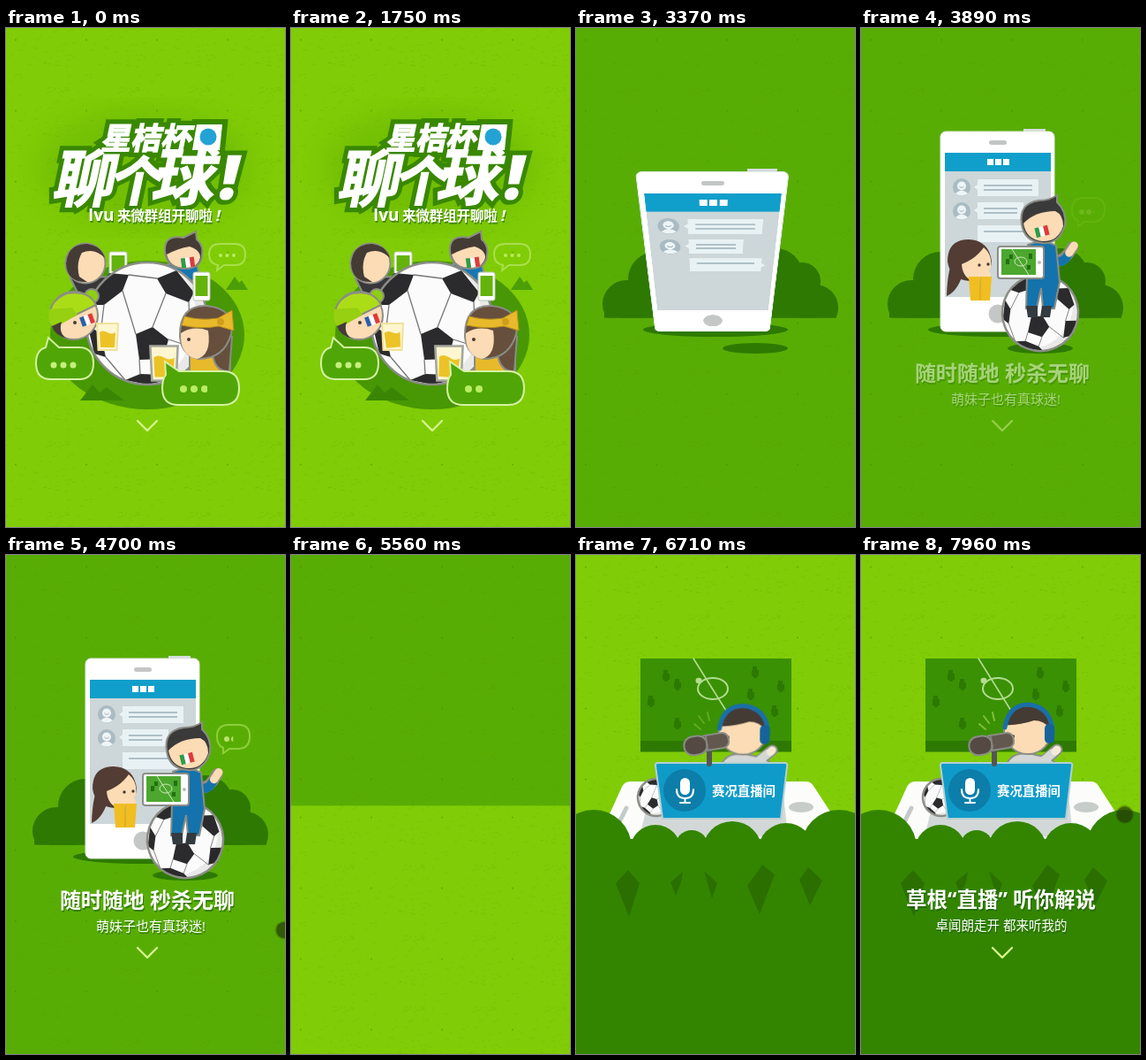
These frames come from a looping animation (316 px wide and 564 px high, 8 s). An HTML page:

```html
<!DOCTYPE html>
<html lang="zh">
<head>
<meta charset="utf-8">
<style>
  html, body { margin: 0; width: 100%; height: 100%; overflow: hidden; background: #80cc06; }
  div, svg { position: absolute; left: 0; top: 0; width: 316px; height: 564px; }
  #stage { overflow: hidden; overflow: clip; contain: strict; }
  text { font-family: "Open Sans", "Noto Sans CJK SC", "Noto Sans CJK", sans-serif; fill: #fff; }
  .shadow { filter: drop-shadow(1px 2px 0 rgba(25, 85, 0, .55)); }
</style>
</head>
<body>
<div id="stage"></div>
<script>
const LOOP = 8000, SKIN = '#fbdcb5', HAIR = '#453b35', EDGE = 'stroke="#8b8d86" stroke-width="2"';
const byId = id => document.getElementById(id);
const clamp = v => Math.max(0, Math.min(1, v));
const span = (t, start, length) => clamp((t - start) / length);
const sine = p => (1 - Math.cos(Math.PI * p)) / 2;
const mix = (a, b, p) => a + (b - a) * p;

// SVG helpers
const circle = (x, y, r, fill, more = '') => `<circle cx="${x}" cy="${y}" r="${r}" fill="${fill}" ${more}/>`;
const oval = (x, y, rx, ry, fill, more = '') => `<ellipse cx="${x}" cy="${y}" rx="${rx}" ry="${ry}" fill="${fill}" ${more}/>`;
const rect = (x, y, w, h, fill, rx = 0, more = '') => `<rect x="${x}" y="${y}" width="${w}" height="${h}" rx="${rx}" fill="${fill}" ${more}/>`;
const path = (d, fill, more = '') => `<path d="${d}" fill="${fill}" ${more}/>`;
const line = (d, color, width, more = '') => path(d, 'none', `stroke="${color}" stroke-width="${width}" stroke-linecap="round" stroke-linejoin="round" ${more}`);
const group = (content, more = '') => `<g ${more}>${content}</g>`;
const label = (str, x, y, size, weight = 400, more = '') => `<text x="${x}" y="${y}" font-size="${size}" font-weight="${weight}" ${more}>${str}</text>`;
const centred = (str, x, y, size, weight = 400) => label(str, x, y, size, weight, 'text-anchor="middle"');

function layer(parent, content, origin) {
  const div = document.createElement('div');
  div.innerHTML = `<svg viewBox="0 0 316 564">${content}</svg>`;
  if (origin) div.style.transformOrigin = origin;
  return parent.appendChild(div);
}

let seed = 7;
const random = () => (seed = seed * 16807 % 2147483647) / 2147483647;
function grain() {
  let d = '';
  for (let i = 0; i < 60; i++) {
    d += `M${(random() * 76).toFixed(1)} ${(random() * 78).toFixed(1)}l${(1 + random() * 3).toFixed(1)} ${(random() * 2 - 1).toFixed(1)}`;
  }
  return `<defs><pattern id="grain" width="80" height="80" patternUnits="userSpaceOnUse">
    ${line(d, '#2f7000', .8, 'opacity=".13"')}${circle(11, 13.5, .9, '#3f8000', 'opacity=".5"')}</pattern></defs>`;
}
const ground = color => rect(0, 0, 316, 564, color) + rect(0, 0, 316, 564, 'url(#grain)');

const flag = (x, y, angle, colors) => group(colors.map((c, i) => rect(i * 5 - 7.5, -5.5, 5, 11, c)).join(''),
  `transform="translate(${x} ${y}) rotate(${angle})"`);
const ITALY = ['#2f9b48', '#fff', '#dd3b3b'], FRANCE = ['#2d5fae', '#fff', '#dd3b3b'];

const ball = (x, y, r, angle = 0) => group(
  circle(0, 0, 69, '#fbfbfb') +
  path('M-60-36L-43-57L-21-55L-28-37L-49-21L-66-21ZM11-51L33-60L53-35L47-24L21-34ZM-13 12L6 4L24 18L18 40L-9 41ZM48 -2L69-10V18L55 28ZM-68 0L-53 12L-47 38L-60 34ZM-25 64L-8 57L18 58L28 63L0 69Z', '#2b2b2d') +
  line('M-21-55L11-51M-28-37L-13 12M21-34L6 4M-49-21L-53 12M47-24L48-2M24 18L55 28M18 40V58M-9 41L-8 57M-47 38L-25 64', '#777', 1.3) +
  path('M38-57A69 69 0 0 1 0 69A80 80 0 0 0 38-57', '#000', 'opacity=".07"') +
  circle(0, 0, 69, 'none', `stroke="#8b8d86" stroke-width="${2.5 * 69 / r}"`),
  `transform="translate(${x} ${y}) scale(${r / 69}) rotate(${angle})"`);

// Typing dots revealed from left to right
const typers = [];
function dots(x, y, gap, r, fill, phase, travel) {
  const id = 'typing' + typers.length;
  typers.push({ id, phase, travel });
  return `<clipPath id="${id}"><rect x="${x - r - 1}" y="${y - 9}" height="18" width="0"/></clipPath>` +
    group([0, 1, 2].map(i => circle(x + i * gap, y, r, fill)).join(''), `clip-path="url(#${id})"`);
}

const arrow = line('M149 444L160 455L171 444', '#d6f590', 2.4);

// Scene 1: title and fans around the ball
const mug = (id, x, y, s, rim) => group(
  path('M-12-15H12L10.500 15H-10.500Z', '#fdf6d0', `stroke="${rim}" stroke-width="2"`) +
  group(path('M-9-5Q-5-8 0-5T9-5L8 12H-8Z', '#ecc327'), `id="${id}"`),
  `transform="translate(${x} ${y}) scale(${s})"`);
const handset = (x, y, w, h) => rect(x, y, w, h, '#fff', 2, 'stroke="#b9c5ae"') + rect(x + 2.5, y + 4, w - 5, h - 9, '#63b30c');

const titleWords =
  group(label('星桔杯', 0, 0, 34, 900), 'transform="translate(107 137) skewX(-12)"') +
  group(label('聊', 0, 0, 70, 900) + label('个', 64, -1, 60, 900) + label('球', 112, -2, 71, 900) + label('!', 187, -3, 68, 900),
    'transform="translate(51 196) skewX(-12)"');
const titleBubble = path('M216 109H245L242 138H229L222 144L221 138H211Z', '#fff');
const title =
  oval(158, 158, 120, 66, '#4f9c00', 'opacity=".28" filter="url(#soft)"') +
  group(titleWords + titleBubble, 'stroke="#398800" stroke-width="12" stroke-linejoin="miter" stroke-miterlimit="2"') +
  group(titleWords, 'stroke="#fff" stroke-width="1.500"') + titleBubble + circle(229, 123, 9.5, '#23a3d5') +
  group(label('Ivu', 93, 218, 19, 700) + label('来微群组开聊啦', 126, 218, 15.4, 700) +
    group(label('!', 0, 0, 17, 700), 'transform="translate(237 218) skewX(-12)"'), 'class="shadow"');

const fans =
  oval(160, 347, 110, 84, '#489705') +
  path('M249 296L259 281L264 288L267 285L274 296Z', '#4c9e07') +
  path('M84 421L98 403L106 412L114 406L134 421Z', '#3a8604') +
  path('M73 283L84 305H104L116 281Z', '#38383a', EDGE) +
  circle(90, 266, 22.5, SKIN, EDGE) +
  path('M92 287Q69 288 68 266Q70 244 92 244Q108 246 112 260Q100 248 86 254Q79 266 83 281Z', HAIR) +
  handset(117, 253, 20, 27) +
  path('M183 267H216L220 284Q200 290 184 278Z', '#1677b2', EDGE) +
  path('M180 252Q179 233 201 237Q207 234 215 230L216 239Q224 246 222 256Q222 272 201 272Q181 270 180 252Z', HAIR, EDGE) +
  path('M182 256Q195 249 208 247Q220 251 220 259Q218 271 202 271Q185 270 182 256Z', SKIN) +
  flag(206, 265, -8, ITALY) +
  ball(160, 334, 69) +
  handset(212, 276, 19, 32) +
  circle(97, 303, 8, '#8fce12', EDGE) +
  circle(77, 325, 27, SKIN, EDGE) +
  path('M51 334Q45 309 69 300Q94 296 102 313L61 333Z', '#abdd17', EDGE) +
  path('M49 318Q46 334 55 339L81 324L75 316Z', '#97d010') +
  path('M63 332Q59 345 69 351Q55 347 52 337Z', HAIR) +
  circle(78, 333, 2, '#4a3a32') + flag(92, 330, -20, FRANCE) +
  path('M208 368H254V392H208Z', '#e8b92a', EDGE) +
  path('M233 342Q247 337 256 349L253 388Q237 389 234 369Z', '#66503d', EDGE) +
  path('M197 349Q196 313 227 314Q260 317 255 346Q247 374 218 374Q199 370 197 349Z', '#66503d', EDGE) +
  path('M198 345Q212 336 229 342Q233 370 216 374Q197 370 198 345Z', SKIN) +
  path('M202 326Q220 331 240 328L256 319L258 342L241 337Q221 341 199 336Z', '#e8b92a', 'stroke="#b98f1d"') +
  circle(243, 332, 4, '#cf9f1b') + circle(207, 352, 2, '#4a3a32') +
  mug('mugLeft', 115, 349, 1, '#efe29a') + mug('mugRight', 179, 379, 1.3, '#a5a69d') +
  path('M45 361L48 350L60 361H83Q99 361 99 379T83 397H51Q34 397 34 379Q34 364 45 361Z', '#50a607', 'stroke="#d5f2a2" stroke-width="2"') +
  path('M181 392L180 377L196 388H246Q264 388 264 407T246 426H195Q177 426 177 407Q177 397 181 392Z', '#50a607', 'stroke="#d5f2a2" stroke-width="2"') +
  path('M243 244H259Q271 244 271 256T259 268H247L239 274L240 268Q230 266 230 256Q230 244 243 244Z', 'none', 'stroke="#a9df4e" stroke-width="2"') +
  dots(54, 381, 11, 3.5, '#c5ef7d', .95, 45) + dots(201, 408, 12, 4, '#b9ec62', .89, 36) + dots(243, 257, 7.5, 2, '#b9ec62', .95, 32);

const stage = byId('stage');
const scene1 = layer(stage, grain() + '<filter id="soft"><feGaussianBlur stdDeviation="16"/></filter>' + ground('#80cc06'));
const content1 = layer(scene1, title + fans + arrow);

// Scene 2: chat on a phone
const page2 = layer(stage, ground('#58ad05'));
const content2 = layer(page2, '');
const DARK = '#2d7901';
const bush2 = layer(content2,
  `<clipPath id="level"><rect width="316" height="327.5"/></clipPath>` +
  group(circle(57, 312, 27, DARK) + circle(90, 284, 31, DARK) + circle(226, 280, 31, DARK) +
    circle(256, 286, 21, DARK) + circle(271, 316, 26, DARK) + rect(50, 296, 222, 32, DARK) + rect(32, 316, 263, 12, DARK), 'clip-path="url(#level)"') +
  oval(158, 341, 82, 8, DARK) + oval(203, 362, 37, 6, DARK));

const avatar = y => circle(114, y, 10, '#aabbc3') + circle(114, y - 1.5, 5, '#eef5f7') +
  path(`M107 ${y + 7}Q114 ${y} 121 ${y + 7}Q114 ${y + 12} 107 ${y + 7}`, '#eef5f7') + line(`M111.5 ${y - 1}Q114 ${y + 2} 116.5 ${y - 1}`, '#9bb0b9', 1);
const message = (x, y, w, rows) => rect(x, y, w, 19, '#e8f2f5') +
  Array.from({ length: rows }, (_, i) => rect(x + 7, y + 6 + i * 5, w - 14, 2, '#aebfc6')).join('');
const phone = layer(content2,
  rect(184, 114, 25, 5, '#d5dcda') + rect(90, 117, 129, 226, '#fff', 6, 'stroke="#e3e8e4"') +
  rect(145, 127, 20, 5, '#c4c5c5', 2.5) + rect(95, 141, 120, 21, '#109fca') +
  [143, 152, 161].map(x => rect(x, 148, 7, 7, '#fff')).join('') +
  rect(95, 162, 120, 142, '#cdd6d9') + avatar(180) + avatar(207) +
  message(132, 171, 69, 2) + message(132, 197, 52, 2) + message(132, 223, 71, 1) +
  path('M132 177L128 180L132 183ZM132 203L128 206L132 209ZM203 230L207 233L203 236Z', '#e8f2f5') +
  circle(155, 323, 10.5, '#c5c6c6'), '155px 343px');

const girl = layer(content2,
  path('M107 258Q98 269 97 303Q111 297 117 272Z', '#523c33') +
  path('M98 264Q98 239 122 239Q145 240 148 264Q146 286 123 286Q101 284 98 264Z', '#523c33') +
  path('M114 267Q130 261 139 248Q149 256 147 271Q142 286 128 287Q115 282 114 267Z', SKIN) +
  circle(134, 268, 1.7, '#4a3a32') + circle(144, 267, 1.7, '#4a3a32') +
  rect(123, 274, 11, 15, SKIN, 5) + rect(136, 274, 11, 15, SKIN, 5) +
  path('M122 281H134L136 308H124ZM135 281H148L146 308H136Z', '#f0be20') + line('M135 282V307', '#cf9a10', 1), '123px 304px');

const boy = layer(content2,
  ball(203, 322, 43, 20) +
  group(line('M216 262Q228 268 240 249', '#8b8d86', 13) + line('M216 262Q228 268 234 258', '#1473ac', 10) +
    line('M236 255L242 247', SKIN, 9), 'id="arm"') +
  path('M189 245Q206 238 221 246L225 287L219 317H206L204 294L199 317H187L188 280Z', '#1473ac', EDGE) +
  path('M187 314H200V327H189ZM205 314H216L214 327H203Z', '#333b40') +
  path('M182 222Q178 198 202 195Q213 195 222 189L222 197Q233 207 231 223Q224 245 205 243Q185 241 182 222Z', '#3b3a3a', EDGE) +
  path('M184 221Q197 207 220 207Q229 211 229 224Q223 242 205 241Q187 239 184 221Z', SKIN) +
  flag(205, 230, -14, ITALY) +
  rect(155, 247, 52, 36, '#fff', 3, EDGE) + rect(159, 250, 39, 29, '#4ba72e') +
  line('M171 250L190 279', '#cfe9bb', 1) + oval(181, 264, 7, 5, 'none', 'stroke="#cfe9bb"') + circle(202, 265, 2, '#bbb') +
  path('M164 261h4v6h-4zM168 256h4v5h-4zM190 255h4v6h-4zM188 268h4v5h-4z', '#236f12'), '203px 362px');

const bubble2 = layer(content2,
  path('M252 192H264Q276 192 276 205T264 219H253L246 224L246 218Q239 215 239 205Q239 192 252 192Z', 'none', 'stroke="#8fce3c" stroke-width="2"') +
  dots(250, 208, 8, 3, '#b8e36f', .62, 35));
const text2 = layer(content2, group(
  centred('随时随地 秒杀无聊', 160, 399, 24, 700) + centred('萌妹子也有真球迷!', 164, 425, 15), 'class="shadow"') + arrow);

// Scene 3: live commentary booth
const page3 = layer(stage, ground('#80cc06'));
const player = (x, y, id = '') => path(`M${x - 2} ${y - 6}h5v4h2v7h-2v2h-4v-2h-2v-7h1z`, '#2c7900', id && `id="${id}"`);
const field = layer(page3,
  rect(73, 117, 171, 105, '#3a9104') + rect(73, 210, 171, 12.5, '#2d7902') +
  line('M133 117L192 211', '#b4dc91', 1.6) + oval(155, 151, 17, 12, 'none', 'stroke="#b4dc91" stroke-width="2"') + oval(139, 142, 3.5, 3.2, '#b4dc91') +
  player(101, 136) + player(114, 146) + player(84, 165) + player(114, 190) +
  player(202, 133, 'runner') + player(197, 157) + player(224, 176) + player(231, 148), '158px 222px');

const tray = layer(page3,
  path('M61 256H260Q266 256 269 261L297 304V324H32V306L52 262Q55 256 61 256Z', '#fcfdfb') +
  path('M86 262H234L240 318H72Z', '#d2d8d7') +
  oval(255, 285, 14, 6, '#c7cccb') + line('M57 286L50 300', '#c4caca', 5), '160px 316px');

const host = layer(page3,
  line('M206 234L222 220', '#8b8d86', 13) +
  path('M165 236Q172 221 194 225L212 229L222 236Z', '#d3d8d6', EDGE) +
  line('M204 235L217 224', '#d3d8d6', 10) + line('M220 222L222 220', '#f6ead6', 9) +
  circle(189, 198, 27, SKIN, EDGE) +
  path('M163 196Q163 172 189 171Q214 174 214 196Q207 187 196 187Q178 193 163 192Z', HAIR) +
  line('M163 195Q167 169 190 169Q216 172 217 201', '#1a6fa6', 5) + rect(208, 191, 11, 22, '#15639a', 5) +
  circle(172, 205, 2, '#4a3a32'), '190px 236px');

const desk = layer(page3,
  ball(91, 274, 21, 40) +
  path('M92 235H237Q240 235 239 239L232 298H98L90 238Q90 235 92 235Z', '#0f9bc9', 'stroke="#b5cfd3" stroke-width="2"') +
  circle(123, 266, 24, '#0c7ea9') + rect(118, 252, 11, 19, '#fff', 5.5) +
  line('M114 265Q114 275 123.500 275T133 265M123.500 275V280M118 280H129', '#fff', 2) +
  label('赛况直播间', 154, 272, 14.4, 700) +
  line('M151 217V236', '#555', 6) +
  group(rect(140, 204, 33, 17, '#62584f', 7, EDGE) + rect(122, 203, 26, 21, '#544a43', 10, EDGE) + line('M148 205V221', '#85837e', 2), 'transform="rotate(-9 147 212)"') +
  line('M134 191L141 197M139 182L145 190M149 178L151 187', '#b8e25b', 2, 'id="sound"'), '165px 298px');

const FRONT = '#338500';
const bush3 = layer(page3,
  [[20, 331, 43], [90, 334, 29], [131, 330, 19], [177, 335, 34], [238, 335, 32], [298, 331, 43]].map(a => circle(...a, FRONT)).join('') +
  rect(0, 321, 316, 243, FRONT) +
  path('M59 356L72 371L60 409L45 371ZM121 358L119 370L113 385L107 370ZM145 357L160 371L154 388ZM211 350L225 361L208 406L194 374ZM263 353L279 368L265 396L253 367Z', '#2a6f00'));
const text3 = layer(page3, group(
  centred('草根“直播” 听你解说', 158.500, 398, 23.500, 700) + centred('卓闻朗走开 都来听我的', 159, 424, 14.500), 'class="shadow"') + arrow);

const finger = layer(stage, group(circle(0, 0, 10.5, 'rgba(30,55,0,.25)') + circle(0, 0, 9, 'rgba(36,56,6,.62)'), 'id="finger"'));

const show = (el, opacity) => { el.style.opacity = opacity; };
function flip(el, t, start, length) {
  const p = sine(span(t, start, length));
  show(el, p > 0 ? 1 : 0);
  el.style.transform = p < 1 ? `perspective(710px) rotateX(${-90 * (1 - p)}deg)` : 'none';
}
function slide(el, t, start) {
  const left = (1 - span(t, start, 600)) ** 1.5;
  el.style.transform = `translateY(${564 * left}px)`;
}
function swipe(t) {
  const start = [7515, 4655, 1930].find(s => t >= s) ?? Infinity;
  const k = t - start, enter = span(k, 0, 200), up = sine(span(k, 200, 420));
  const x = mix(322, 305, 1 - (1 - enter) ** 2) - 10 * up;
  const y = mix(418, 444, enter) - 238 * up;
  const visible = k >= 0 ? 1 - span(k, 700, 150) : 0;
  show(finger, visible);
  if (visible) byId('finger').setAttribute('transform', `translate(${x} ${y})`);
}

function draw(t) {
  const wave = Math.sin(t / 1000 * 2 * Math.PI);
  for (const { id, phase, travel } of typers) {
    byId(id).firstChild.setAttribute('width', (t / 1000 + phase) % 1 * travel);
  }
  byId('mugLeft').setAttribute('transform', `rotate(${5 * wave})`);
  byId('mugRight').setAttribute('transform', `rotate(${-5 * wave})`);
  byId('arm').setAttribute('transform', `rotate(${4 * wave} 218 262)`);
  byId('runner').setAttribute('transform', `translate(0 ${wave})`);
  byId('sound').setAttribute('opacity', .65 + .35 * wave);

  show(content1, t < 2555 ? 1 : 0);
  slide(page2, t, 2555);
  show(content2, t < 5340 ? 1 : 0);
  show(bush2, span(t, 3155, 200));
  flip(phone, t, 3160, 480);
  flip(girl, t, 3358, 400);
  flip(boy, t, 3500, 400);
  show(bubble2, span(t, 3850, 200));
  show(text2, span(t, 3750, 300));

  slide(page3, t, 5340);
  show(bush3, span(t, 5950, 270));
  flip(field, t, 5955, 450);
  flip(tray, t, 6250, 300);
  flip(desk, t, 6400, 300);
  flip(host, t, 6500, 300);
  show(text3, span(t, 6780, 300));
  swipe(t);
}

const began = performance.now();
function tick() {
  draw((performance.now() - began) % LOOP);
  requestAnimationFrame(tick);
}
tick();
</script>
</body>
</html>
```
